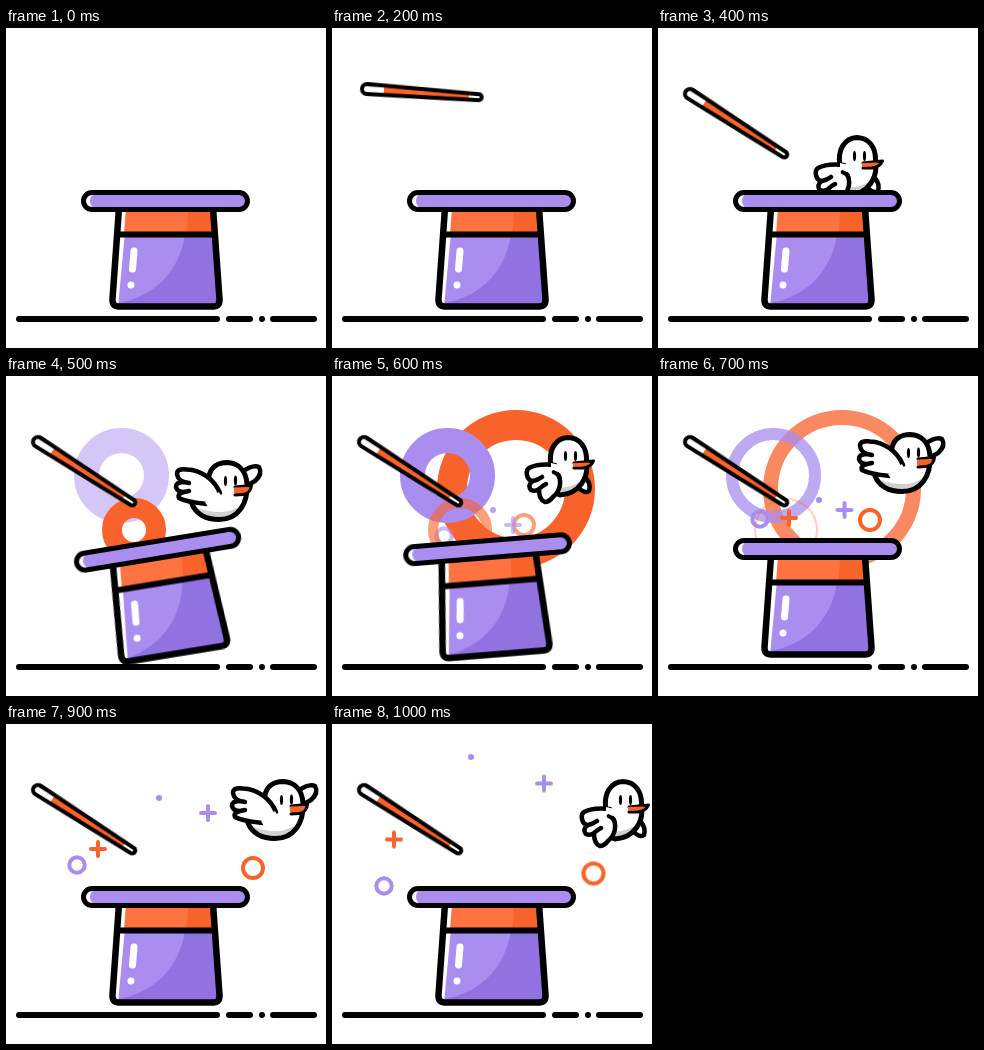
Animation, 320 px wide and 320 px high, one loop 1.2 s. Source, as an HTML page:

```html
<!DOCTYPE html>
<html lang="en">
<head>
<meta charset="utf-8">
<title>Magic hat</title>
<style>
  :root { --lilac: #a98ef0; --violet: #9072e0; --orange: #f8622b; --amber: #ff7340; }
  html, body { margin: 0; width: 100%; height: 100%; overflow: hidden; background: #fff; }
  svg { display: block; width: 100vw; height: 100vh; }

  .line { fill: none; stroke: #000; stroke-linecap: round; stroke-linejoin: round; }
  .lilac { stroke: var(--lilac); }
  .orange { stroke: var(--orange); }
  .ring { fill: none; }
  .bit { fill: none; stroke-width: 4; stroke-linecap: round; }

  /* Every part moves in held poses, one per 100 ms. */
  .anim { animation: 1200ms step-end infinite; }
  #hat { animation-name: tilt; transform-origin: 160px 222px; }
  #wand { animation-name: swing; }
  #perch { animation-name: perch; }
  #flap { animation-name: flap; }
  #burstA { animation-name: burstA; }
  #burstB { animation-name: burstB; }
  #burstC { animation-name: burstC; }
  #hoopA { animation-name: hoopA; }
  #hoopB { animation-name: hoopB; }
  #plusA { animation-name: plusA; }
  #plusB { animation-name: plusB; }
  #dot { animation-name: dot; }

  @keyframes tilt {
    0%, 58.33% { transform: none; }
    41.66% { transform: rotate(-9.3deg); }
    49.99% { transform: rotate(-4.6deg); }
  }
  @keyframes swing {
    0% { opacity: 0; }
    16.66% { opacity: 1; transform: translate(35px, 61px) rotate(4.2deg); }
    24.99% { opacity: 1; transform: translate(33.5px, 63px) rotate(20deg); }
    33.33%, 100% { opacity: 1; transform: translate(32px, 66px) rotate(32.7deg); }
  }
  @keyframes perch {
    0%, 41.66%, 58.33%, 74.99% { opacity: 0; }
    33.33% { opacity: 1; transform: translate(-61px, 53px); }
    49.99% { opacity: 1; transform: translate(-24px, 5px); }
    66.66% { opacity: 1; transform: none; }
    83.33%, 100% { opacity: 1; transform: translate(31px, 1px); }
  }
  @keyframes flap {
    0%, 49.99%, 66.66%, 83.33%, 100% { opacity: 0; }
    41.66% { opacity: 1; transform: none; }
    58.33% { opacity: 1; transform: translate(31px, -28px); }
    74.99% { opacity: 1; transform: translate(56px, -29px); }
  }

  /* Rings thin out while the outer edge stays put. */
  @keyframes burstA {
    0%, 74.99%, 100% { opacity: 0; }
    41.66% { opacity: .5; r: 35px; stroke-width: 25px; }
    49.99% { opacity: 1; r: 35px; stroke-width: 25px; }
    58.33% { opacity: .75; r: 41.5px; stroke-width: 12px; }
    66.66% { opacity: .4; r: 46.5px; stroke-width: 2px; }
  }
  @keyframes burstB {
    0%, 74.99%, 100% { opacity: 0; }
    49.99% { opacity: 1; r: 64px; stroke-width: 30px; }
    58.33% { opacity: .75; r: 71.5px; stroke-width: 15px; }
    66.66% { opacity: .4; r: 78px; stroke-width: 2px; }
  }
  @keyframes burstC {
    0%, 66.66%, 100% { opacity: 0; }
    41.66% { opacity: 1; r: 22px; stroke-width: 20px; }
    49.99% { opacity: .6; r: 27px; stroke-width: 10px; }
    58.33% { opacity: .3; r: 31px; stroke-width: 2px; }
  }

  @keyframes hoopA {
    0% { opacity: 0; }
    49.99% { opacity: .6; transform: translate(112px, 160px); }
    58.33% { opacity: 1; transform: translate(102px, 143px); }
    66.66% { opacity: 1; transform: translate(91.5px, 132px); }
    74.99% { opacity: 1; transform: translate(71px, 141px); }
    83.33%, 100% { opacity: 1; transform: translate(52px, 162px); }
  }
  @keyframes hoopB {
    0% { opacity: 0; }
    49.99% { opacity: .6; transform: translate(192px, 149px); }
    58.33% { opacity: 1; transform: translate(212px, 144px); }
    66.66% { opacity: 1; transform: translate(232px, 139.5px); }
    74.99% { opacity: 1; transform: translate(247px, 144px); }
    83.33%, 100% { opacity: 1; transform: translate(261.5px, 149.5px); }
  }
  @keyframes plusA {
    0% { opacity: 0; }
    58.33% { opacity: 1; transform: translate(131px, 142px); }
    66.66% { opacity: 1; transform: translate(122px, 135px); }
    74.99% { opacity: 1; transform: translate(92px, 125px); }
    83.33%, 100% { opacity: 1; transform: translate(62px, 115.5px); }
  }
  @keyframes plusB {
    0% { opacity: 0; }
    49.99% { opacity: .6; transform: translate(181px, 149px); }
    58.33% { opacity: 1; transform: translate(186.5px, 134px); }
    66.66% { opacity: 1; transform: translate(192px, 119.5px); }
    74.99% { opacity: 1; transform: translate(202px, 89px); }
    83.33%, 100% { opacity: 1; transform: translate(212px, 59.5px); }
  }
  @keyframes dot {
    0% { opacity: 0; }
    49.99% { opacity: .8; transform: translate(161px, 134px); }
    58.33% { opacity: 1; transform: translate(161px, 124px); }
    66.66% { opacity: 1; transform: translate(161px, 114px); }
    74.99% { opacity: 1; transform: translate(153px, 74px); }
    83.33%, 100% { opacity: 1; transform: translate(139px, 33px); }
  }
</style>
</head>
<body>
<svg viewBox="0 0 320 320">
  <defs>
    <path id="body" d="M113 180L106.5 271Q106 278.500 113 278.500H207Q214 278.500 213.500 271L207 180Z"/>
    <path id="stick" d="M0 -5L112 -3A3 3 0 0 1 112 3L0 5A5 5 0 0 1 0 -5Z"/>
    <path id="perchBody" d="M243 86C240 68 248 57 260 56.500C272 57 279 66 278.500 80C281 97 271 113 252 114L238 108Z"/>
    <path id="flapBody" d="M203 100C205 91 212 86.500 221 86.500C232 87 240 94 241 108C242 128 232 143.500 213 143.500C200 143.500 190 138 186 128Z"/>
    <clipPath id="inBody"><use href="#body"/></clipPath>
    <clipPath id="inStick"><use href="#stick"/></clipPath>
    <clipPath id="inPerch"><use href="#perchBody"/></clipPath>
    <clipPath id="inFlap"><use href="#flapBody"/></clipPath>
  </defs>

  <path class="line" stroke-width="6" d="M13 291H211M223 291H244M256 291h.01M267 291H308"/>

  <circle id="burstB" class="ring orange anim" cx="184" cy="113" r="64"/>
  <circle id="burstA" class="ring lilac anim" cx="115.500" cy="99.500" r="35"/>
  <circle id="hoopA" class="bit lilac anim" r="7.700"/>
  <circle id="hoopB" class="bit orange anim" r="10"/>
  <path id="plusA" class="bit orange anim" d="M-7 0H7M0 -7V7"/>
  <path id="plusB" class="bit lilac anim" d="M-7 0H7M0 -7V7"/>
  <circle id="dot" class="anim" r="3" fill="var(--lilac)"/>
  <circle id="burstC" class="ring orange anim" cx="128" cy="154" r="22"/>

  <g id="wand" class="anim">
    <use href="#stick" fill="#fff"/>
    <path clip-path="url(#inStick)" fill="var(--orange)" d="M17 -6H102V6H17Z"/>
    <use href="#stick" class="line" stroke-width="4"/>
  </g>

  <g id="perch" class="anim">
    <path class="line" style="fill:#fff" stroke-width="4.500" d="M271 107Q277 113 281 110Q283 103 278 97"/>
    <use href="#perchBody" fill="#fff"/>
    <path clip-path="url(#inPerch)" fill="#d0d0d0" d="M282 92Q268 108 246 107V118H284Z"/>
    <use href="#perchBody" class="line" stroke-width="5"/>
    <path class="line" style="fill:#fff" stroke-width="4.500" d="M247 84Q230 82 221 87Q217 90 220 97Q222 100 225 100Q219 104 223 109Q227 111 231 108Q231 119 237 121Q241 121 245 116Q253 109 252 100Q252 93 246 91M225 100Q230 99 234 96M231 108Q234 105 238 103"/>
    <path fill="#fff" d="M243 82L252 84L250 91L243 88Z"/>
    <ellipse cx="257.500" cy="75" rx="1.600" ry="5"/>
    <ellipse cx="267.500" cy="75" rx="1.600" ry="5"/>
    <path class="line" style="fill:var(--orange)" stroke-width="3" d="M266 82L285.500 80Q283 86 275 87L266 87"/>
    <path fill="var(--orange)" d="M265 82L281 81.500Q279 84.500 273 85.500L265 86Z"/>
  </g>

  <g id="flap" class="anim">
    <path class="line" style="fill:#fff" stroke-width="4.500" d="M236 96Q247 88 253 91Q257 98 249 105L240 110"/>
    <use href="#flapBody" fill="#fff"/>
    <path clip-path="url(#inFlap)" fill="#d0d0d0" d="M245 118Q232 137 212 136Q196 136 184 128V148H245Z"/>
    <use href="#flapBody" class="line" stroke-width="5"/>
    <path class="line" style="fill:#fff" stroke-width="4.500" d="M214 117C208 103 195 94 181 93.500Q171 92 171 98Q172 104 178 106Q170 106 170 111Q171 116 178 116Q171 118 173 122Q180 126 201 128M178 106L183 107M178 116L183 115"/>
    <path fill="#fff" d="M199 126L213 116L218 125L202 131Z"/>
    <ellipse cx="219.500" cy="105" rx="1.600" ry="5"/>
    <ellipse cx="229.500" cy="104.500" rx="1.600" ry="5"/>
    <path class="line" style="fill:var(--orange)" stroke-width="3" d="M229 111L245.500 109.500Q245 117 237 118.500L229 119"/>
    <path fill="var(--orange)" d="M228 111.500L243 111Q241 115 236 116.500L228 117.500Z"/>
  </g>

  <g id="hat" class="anim">
    <g clip-path="url(#inBody)">
      <path fill="#fff" d="M100 180H220V285H100Z"/>
      <path fill="var(--lilac)" d="M119 204H220V285H111.500Z"/>
      <path fill="var(--violet)" d="M179 206H220V285H111L113 275C150 268 174 242 179 206Z"/>
      <path fill="var(--amber)" d="M120 180H220V206H118Z"/>
      <path fill="var(--orange)" d="M182 180H220V206H180Q182 194 182 180Z"/>
    </g>
    <use href="#body" class="line" stroke-width="6.500"/>
    <path class="line" stroke-width="6" d="M113 206.500H207"/>
    <path class="line" style="stroke:#fff" stroke-width="7" d="M128 223L126.500 241M125 257h.01"/>
    <rect x="77.500" y="164.500" width="164" height="17" rx="8.500" fill="#fff"/>
    <rect x="84" y="165" width="157" height="16" rx="8" fill="var(--lilac)"/>
    <rect class="line" x="77.500" y="164.500" width="164" height="17" rx="8.500" stroke-width="5"/>
  </g>
</svg>
</body>
</html>
```
